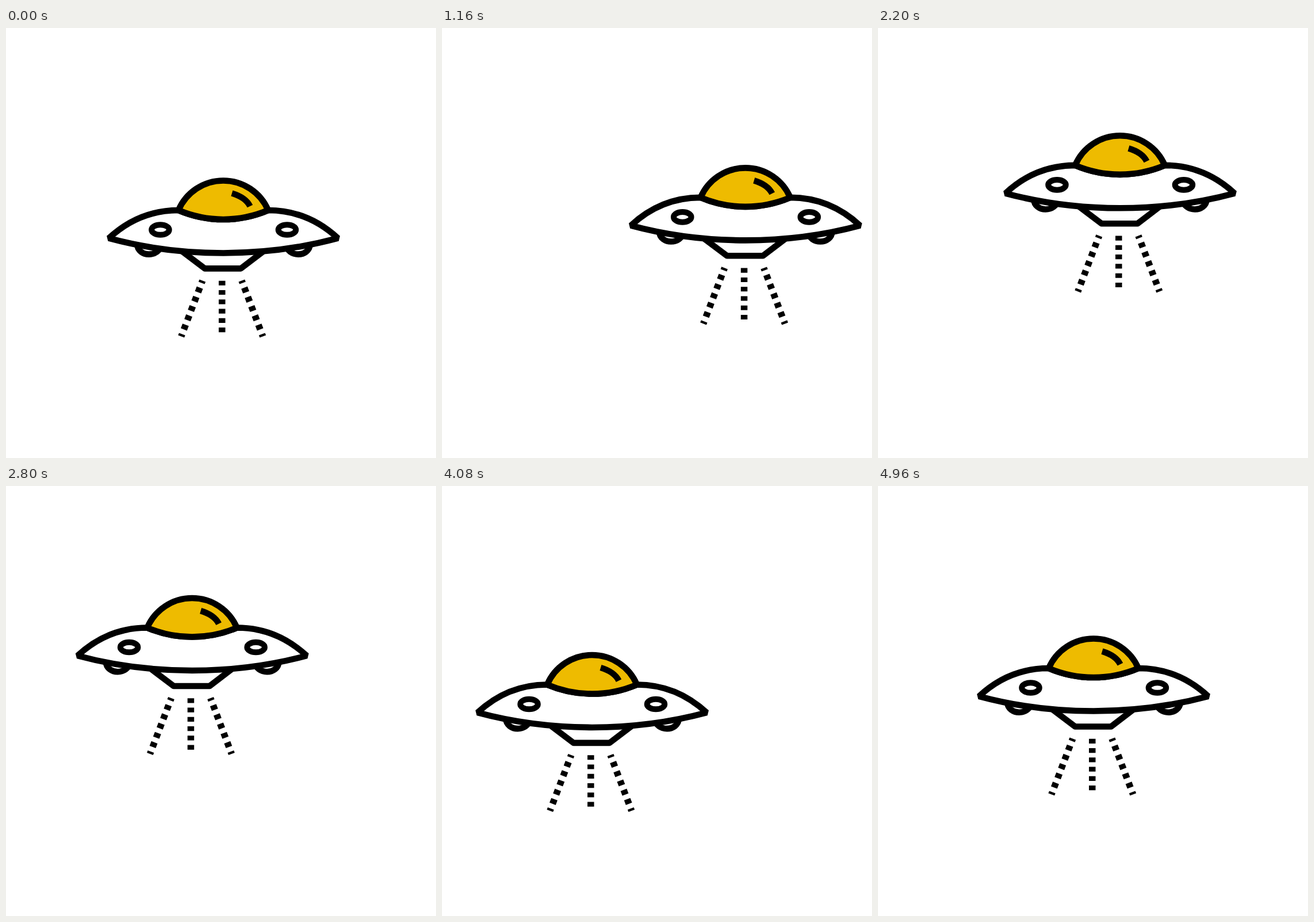
Write an HTML page that moves like this. It is 748 by 748 pixels and loops after 5 s.

```html
<!DOCTYPE html>
<html lang="en">
<head>
<meta charset="utf-8">
<title>Flying saucer</title>
<style>
  html, body { margin: 0; width: 100%; height: 100%; overflow: hidden; background: #fff; }
  svg { display: block; width: 100%; height: 100%; }
  #ship { fill: #fff; stroke: #000; stroke-width: 10.6; stroke-linejoin: bevel; }
  .light { stroke-width: 10; }
  .open { fill: none; }
  .beam { fill: none; stroke-width: 11.5; stroke-dasharray: 1; }
  .side { stroke-dashoffset: .5; }
</style>
</head>
<body>
<svg viewBox="0 0 748 748">
  <g id="ship">
    <path id="foot" d="M228 376C229.5 399.5 267.5 399.5 270 376"/>
    <use href="#foot" transform="matrix(-1 0 0 1 757 0)"/>
    <path d="M307 389L346 418.4H408.5L447 389" stroke-linejoin="round"/>
    <path d="M178.8 365.7C215 332 255 317 300 317C326 328 352 333 378 333C404 333 430 328 456 317C501 317 541 332 577.4 365.7C450 400 306 400 178.8 365.7Z"/>
    <path d="M300 317A84.8 84.8 0 0 1 456 317C430 328 404 333 378 333C352 333 326 328 300 317Z" fill="#eebb00"/>
    <path class="open" d="M393 287.5Q416.8 294.6 424.5 310"/>
    <ellipse class="light" cx="268.5" cy="351" rx="15.3" ry="8.8"/>
    <ellipse class="light" cx="489" cy="351" rx="15.3" ry="8.8"/>
    <path class="beam side" pathLength="12" d="M341.8 439.5L304.8 536.5"/>
    <path class="beam" pathLength="11" d="M375.8 439.7V529.2"/>
    <path class="beam side" pathLength="12" d="M410 439.5L446.8 536.5"/>
  </g>
</svg>
<script>
  const LOOP = 5000, STEP = 40, LAP = 4980;
  // Points of the flight path, evenly spaced in time over one lap
  const path = [
    [0, 0], [56, 26], [104, 35], [134, 6], [151, -33], [125.5, -72], [87, -89.5], [46, -79.5],
    [-2.5, -54.5], [-54.5, -70.5], [-97, -77], [-133, -48.5], [-145, -10.5], [-120.5, 25.5],
    [-83, 44.5], [-42, 22]
  ];
  const point = i => path[(i + path.length) % path.length];

  // Closed Catmull-Rom spline
  function position(t) {
    const s = t / LAP * path.length, i = Math.floor(s), u = s - i;
    const [p, q, r, v] = [-1, 0, 1, 2].map(k => point(i + k));
    return [0, 1].map(k => q[k] + u / 2 * (r[k] - p[k]
      + u * (2 * p[k] - 5 * q[k] + 4 * r[k] - v[k]
      + u * (3 * (q[k] - r[k]) + v[k] - p[k]))));
  }

  const ship = document.getElementById('ship');
  const start = performance.now();

  function draw(now) {
    const t = Math.floor(Math.max(0, now - start) % LOOP / STEP) * STEP;
    const [x, y] = position(t);
    ship.setAttribute('transform', `translate(${x.toFixed(2)} ${y.toFixed(2)})`);
    requestAnimationFrame(draw);
  }
  draw(start);
</script>
</body>
</html>
```
